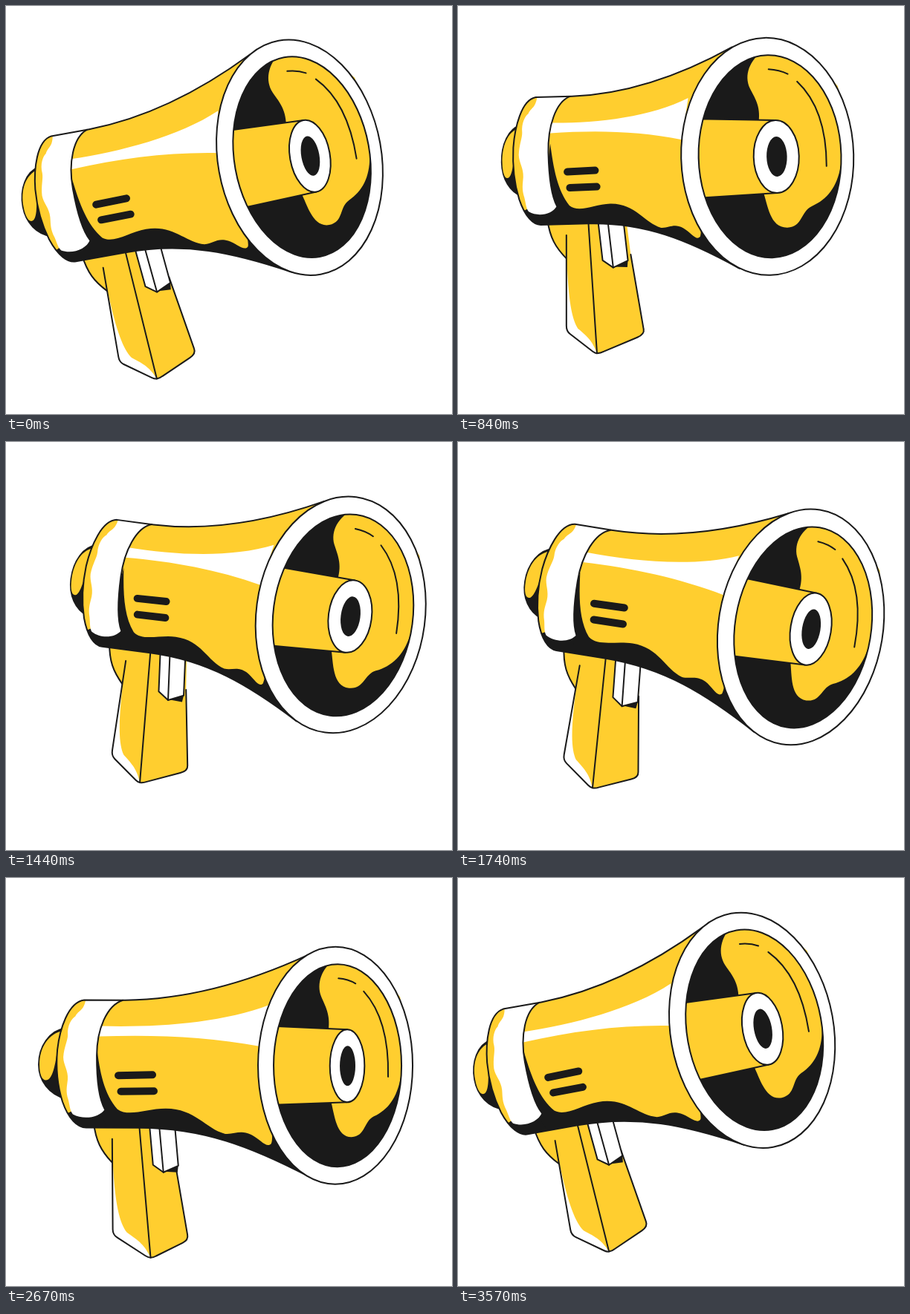
Recreate the animation shown at these times as an HTML page with a canvas. Size 600x550 px, loop 3600 ms.

```html
<!DOCTYPE html>
<html lang="en">
<head>
<meta charset="utf-8">
<title>Megaphone</title>
<style>
html, body { margin: 0; width: 100%; height: 100%; overflow: hidden; background: #fff; }
canvas { display: block; }
</style>
</head>
<body>
<canvas id="stage" width="600" height="550"></canvas>
<script>
const ctx = document.getElementById('stage').getContext('2d');
const YELLOW = '#ffce2f', BLACK = '#1a1a1a', WHITE = '#fff';
const LOOP = 3600, STEP = 30;

// Sideways shift of each part at full turn: a + b * x + c * y
const depth = {
  bell: [-51.4, .116], tube: [-4], face: [-146.3, .31],
  body: [40.6, -.115], side: [50.9, -.188], wave: [48.4, -.155], knob: [53.5, -.27],
  gripLeft: [65.2, -.189, -.0314], gripRight: [.4, .2405, -.0684], bump: [27], trigger: [20]
};

const oval = (x, y, rx, ry) =>
  `M${x - rx} ${y}a${rx} ${ry} 0 1 0 ${2 * rx} 0a${rx} ${ry} 0 1 0 ${-2 * rx} 0Z`;

const shellPath = 'M105 165L160 165C245 164 325 141 405 104L440 252L408 402.5C330 362 265 337 180 337' +
  'L108 337C96 337 84 325 76 302C69 280 67 255 69 232C72 205 83 168 105 165Z';
const bandEdge = 'M157 165C135 172 122 205 122 240C122 275 126 300 133 312';
const gripCorner = 'L195 512Q199 512 202 510L238 492Q246 488 244.5 481L227 380';
const gripFoot = 'L144 474Q144 481 150 485L188 509.5Q192 512 195 512';
const innerOval = oval(446, 252.5, 86, 136.5);

let turn = 0;

function place(d, part) {
  const [a, b = 0, c = 0] = depth[part];
  const path = new Path2D();
  path.addPath(new Path2D(d), new DOMMatrix([1 + b * turn, 0, c * turn, 1, a * turn, 0]));
  return path;
}

function paint(part, d, fill, width) {
  const path = place(d, part);
  if (fill) {
    ctx.fillStyle = fill;
    ctx.fill(path, 'evenodd');
  }
  if (width) {
    ctx.lineWidth = width;
    ctx.stroke(path);
  }
}

function drawHandle() {
  paint('bump', 'M118 330C121 355 128 368 143 384L150 384L150 330Z', YELLOW, 2);
  paint('gripRight', 'M179 330' + gripCorner + 'L220 330Z', YELLOW);
  paint('gripLeft', 'M143 352' + gripFoot + 'L179 330L133 330L133 335Z', YELLOW);
  paint('gripLeft', 'M144 385' + gripFoot + 'C187 495 180 490 163 478C153 465 147 440 144 385Z', WHITE);
  paint('gripLeft', 'M143 352' + gripFoot, null, 2);
  paint('gripRight', 'M179 330' + gripCorner, null, 2);
  paint('trigger', 'M212 396L232 388L231 397Z', BLACK);
  paint('trigger', 'M193 332L198 387L212 397L232 388L227 332Z', WHITE, 2);
  paint('trigger', 'M206 332L212 397', null, 2);
}

function drawBody() {
  paint('knob', 'M80 203C58 206 44 228 44 252C44 274 58 292 80 298Z', BLACK, 2);
  paint('knob', 'M78 206C56 210 45 230 45 252C45 268 50 276 57 272C64 267 67 248 70 225Z', YELLOW);

  ctx.save();
  ctx.clip(place(shellPath, 'body'));
  paint('body', shellPath, YELLOW);
  paint('side', 'M126 200C200 202 290 196 354 171L342 227C270 214 200 211 124 214Z', WHITE);
  paint('wave', 'M122 228C126 262 132 292 150 312C165 323 190 311 215 311C255 311 268 338 295 345' +
    'C308 346 315 339 330 346C342 352 351 365 357 358C359 352 358 345 357 338L400 330L420 420L100 420L110 300Z', BLACK);
  paint('body', 'M60 306L84 317L120 300L140 345L60 345Z', BLACK);
  paint('body', bandEdge + 'C126 323 105 327 90 319C86 314 86 308 84 300C80 288 82 282 83 272' +
    'C84 260 77 252 77 242C78 228 83 220 83 212C82 200 88 190 93 187C98 178 104 180 107 165Z', WHITE);
  ctx.restore();

  paint('body', bandEdge, null, 2);
  paint('body', shellPath, null, 2);
  paint('side', 'M151 266.5L197 265.5M154.5 288L199 287.5', null, 10);
}

function drawBell() {
  paint('bell', innerOval, BLACK);
  paint('bell', 'M443 108C424 122 417 142 424 160C431 176 437 186 433 210L437 300C442 318 444 349 465 349' +
    'C484 348 481 328 495 321C514 312 526 296 531 268L540 250L530 160L490 110Z', YELLOW);
  paint('bell', 'M447 135Q460 136 470 142M481 152.5C506 180 515 220 514 267.5', null, 2);
  paint('tube', 'M354 199.5L459 204L459 302L354 306Z', YELLOW, 2);
  paint('bell', oval(443, 252.5, 104, 160) + innerOval, WHITE, 2);
  paint('face', oval(459, 253, 23.3, 49), WHITE, 2);
  paint('face', oval(459.5, 253, 10.5, 27), BLACK);
}

function frame(now) {
  const phase = 2 * Math.PI * Math.floor(now % LOOP / STEP) * STEP / LOOP;
  const cos = Math.cos(phase), sin = Math.sin(phase);
  turn = (1 + sin) / 2;

  ctx.setTransform(1, 0, 0, 1, 0, 0);
  ctx.fillStyle = WHITE;
  ctx.fillRect(0, 0, 600, 550);
  ctx.strokeStyle = BLACK;
  ctx.lineCap = ctx.lineJoin = 'round';

  // The whole object sways around the centre of the bell
  ctx.translate(429.6 - 33.7 * cos - 10.8 * sin - .9 * Math.cos(2 * phase),
    228.2 - 24 * cos - 23.2 * sin + 1.1 * Math.sin(2 * phase));
  ctx.rotate((-.4 - 9.8 * cos) * Math.PI / 180);
  ctx.translate(-443, -252.5);

  drawHandle();
  drawBody();
  drawBell();
  requestAnimationFrame(frame);
}
requestAnimationFrame(frame);
</script>
</body>
</html>
```
